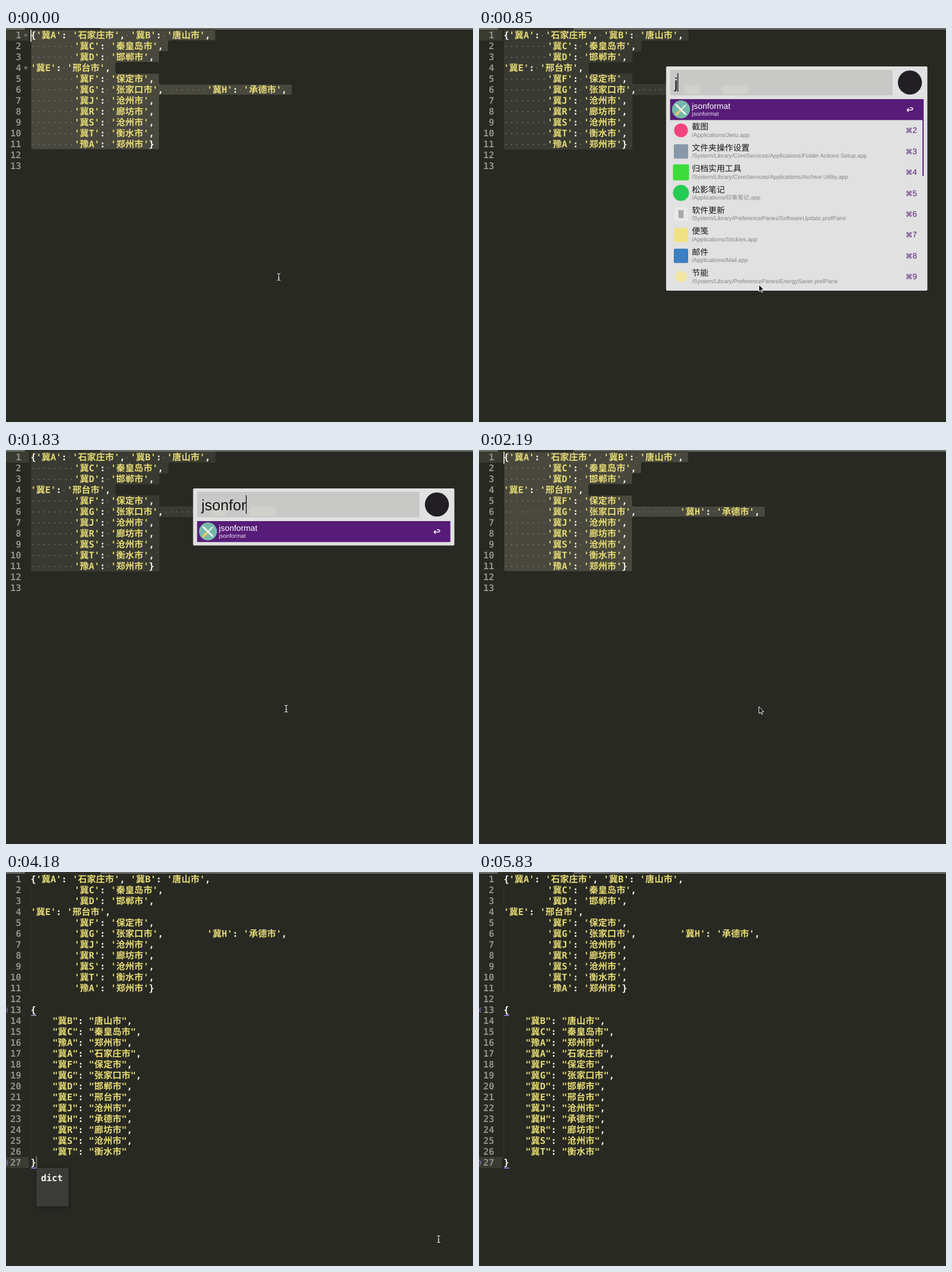
These frames come from a looping animation (815 by 687 pixels, 5.93 s). An HTML page:

```html
<!DOCTYPE html>
<html lang="zh-CN">
<head>
<meta charset="utf-8">
<title>JSON formatting</title>
<style>
  html, body { margin: 0; width: 100%; height: 100%; overflow: hidden; background: #282923; }
  svg { display: block; width: 815px; height: 687px; }
  text { white-space: pre; text-rendering: geometricPrecision; }
  .code { font: bold 15.85px "DejaVu Sans Mono", monospace; }
  .han { font: bold 15.8px "Noto Sans CJK SC", "Noto Sans CJK", sans-serif; }
  .ui { font-family: "Liberation Sans", "Noto Sans CJK SC", "Noto Sans CJK", sans-serif; }
  .popup { filter: drop-shadow(0 1px 3px rgba(0, 0, 0, .35)); }
</style>
</head>
<body>
<svg id="stage" viewBox="0 0 815 687" xmlns="http://www.w3.org/2000/svg"></svg>
<script>
const LOOP = 5930;
const LEFT = 42.9, TOP = 3, LINE = 19, CELL = 9.54, HAN = 15.8;
const YELLOW = '#e6db74', WHITE = '#f8f8f2', PURPLE = '#571c78', VIOLET = '#ae81ff';
const stage = document.getElementById('stage');

function el(tag, attrs = {}, parent = stage, text) {
  const node = document.createElementNS('http://www.w3.org/2000/svg', tag);
  for (const key in attrs) node.setAttribute(key, attrs[key]);
  if (text !== undefined) node.textContent = text;
  parent.appendChild(node);
  return node;
}
const rect = (x, y, width, height, fill, parent, rx = 0) =>
  el('rect', { x, y, width, height, fill, rx }, parent);
const group = parent => el('g', {}, parent);
const show = (node, on) => node.setAttribute('visibility', on ? 'visible' : 'hidden');
const rowTop = row => TOP + LINE * (row - 1);
const isHan = ch => ch > '\u2e80';
const textWidth = s => [...s].reduce((w, ch) => w + (isHan(ch) ? HAN : CELL), 0);

// value of the last key at or before t
function held(keys, t) {
  let value = keys[0][1];
  for (const [at, v] of keys) if (t >= at) value = v;
  return value;
}

const pad = ' '.repeat(8);
const pair = (key, city) => `'${key}': '${city}'`;
const source = [
  `{${pair('冀A', '石家庄市')}, ${pair('冀B', '唐山市')},`,
  `${pad}${pair('冀C', '秦皇岛市')},`,
  `${pad}${pair('冀D', '邯郸市')},`,
  `${pair('冀E', '邢台市')},`,
  `${pad}${pair('冀F', '保定市')},`,
  `${pad}${pair('冀G', '张家口市')},${pad}${pair('冀H', '承德市')},`,
  `${pad}${pair('冀J', '沧州市')},`,
  `${pad}${pair('冀R', '廊坊市')},`,
  `${pad}${pair('冀S', '沧州市')},`,
  `${pad}${pair('冀T', '衡水市')},`,
  `${pad}${pair('豫A', '郑州市')}}`
];
const cities = {};
for (const m of source.join().matchAll(/'(..)': '(.+?)'/g)) cities[m[1]] = m[2];
const order = [...'BC', '豫A', ...'AFGDEJHRST'].map(k => k.length > 1 ? k : '冀' + k);
const result = ['{', ...order.map((k, i) =>
  `    "${k}": "${cities[k]}"${i < order.length - 1 ? ',' : ''}`), '}'];

function drawCode(line, row, parent, dots) {
  let x = LEFT, quoted = false, run = null;
  const flush = () => {
    if (run) el('text', { x: run.x, y: rowTop(row) + 15, class: run.cls, fill: run.fill }, parent, run.s);
    run = null;
  };
  for (const ch of line) {
    const quote = ch === "'" || ch === '"';
    const fill = quoted || quote ? YELLOW : WHITE;
    const cls = isHan(ch) ? 'han' : 'code';
    if (quote) quoted = !quoted;
    if (ch === ' ') {
      flush();
      if (dots) el('circle', { cx: x + CELL / 2 - .5, cy: rowTop(row) + 10, r: 1, fill: '#7a7868' }, dots);
    } else {
      if (run && (run.fill !== fill || run.cls !== cls)) flush();
      run = run || { x, fill, cls, s: '' };
      run.s += ch;
    }
    x += isHan(ch) ? HAN : CELL;
  }
  flush();
}

const lineNumber = (row, parent) =>
  el('text', { x: 26.5, y: rowTop(row) + 15, class: 'code', fill: '#90918b', 'text-anchor': 'end' }, parent, row);

function guide(from, to, parent) {
  el('path', { d: `M43.5 ${rowTop(from)}V${rowTop(to + 1)}`, stroke: '#45463e', 'stroke-dasharray': '1 1' }, parent);
}

// outline of the selected rows, with rounded corners
function selectionPath(radius) {
  const ends = source.map(s => LEFT + textWidth(s) + 9);
  const points = [[43.5, TOP]];
  ends.forEach((x, i) => {
    if (i && Math.abs(x - ends[i - 1]) < .1) points.pop();
    else points.push([x, rowTop(i + 1)]);
    points.push([x, rowTop(i + 2)]);
  });
  points.push([43.5, rowTop(12)]);
  const toward = (a, b) => {
    const d = Math.hypot(b[0] - a[0], b[1] - a[1]) || 1;
    return [a[0] + (b[0] - a[0]) / d * radius, a[1] + (b[1] - a[1]) / d * radius];
  };
  return points.map((p, i) => {
    const before = points[(i + points.length - 1) % points.length];
    const after = points[(i + 1) % points.length];
    return `${i ? 'L' : 'M'}${toward(p, before)}Q${p} ${toward(p, after)}`;
  }).join('') + 'Z';
}

// editor
rect(0, 0, 815, 687, '#282923');
rect(0, 0, 815, 3, '#696a66');
rect(33, 0, 132, 3, '#32332d');
const activeRow = rect(0, TOP, 40, LINE, '#3a3b31');
const selection = el('path', { d: selectionPath(2.5) });
const dots = group();
const guides = group();
guide(2, 3, guides);
guide(5, 11, guides);
const codeLayer = group();
source.forEach((line, i) => drawCode(line, i + 1, codeLayer, dots));
for (let row = 1; row <= 13; row++) lineNumber(row, codeLayer);

const folds = group();
for (const row of [1, 4])
  el('path', { d: `M30.5 ${rowTop(row) + 7.5}h8l-4 6z`, fill: '#6b6c66' }, folds);

const pasted = group();
guide(14, 26, pasted);
result.forEach((line, i) => drawCode(line, i + 13, pasted));
for (let row = 14; row <= 27; row++) lineNumber(row, pasted);
const underlines = [13, 27].map(row => rect(44, rowTop(row) + 18.5, 9, 1.5, VIOLET, pasted));
[['{', 13], ['}', 27]].forEach(([ch, row]) =>
  el('text', { x: -1, y: rowTop(row) + 12.5, 'font-size': 10, 'font-family': '"DejaVu Sans Mono", monospace', fill: VIOLET }, pasted, ch));

const caret = rect(0, 0, 1.6, 21, WHITE);

const popup = el('g', { class: 'popup' });
rect(53, 516, 56, 67, '#3b3c38', popup);
el('text', { x: 61, y: 539, class: 'code', fill: WHITE }, popup, 'dict');

// launcher
const launcher = group();
const panel = rect(326.5, 67, 456, 57, '#e1e1e1', launcher, 2);
rect(333.5, 73, 388, 44.5, '#c8c8c7', launcher);
rect(358, 99, 29, 16, '#d1d0cb', launcher, 8);
rect(423, 99, 48, 16, '#d1d0cb', launcher, 8);
const query = el('text', { x: 341, y: 105, class: 'ui', 'font-size': 26, fill: '#161616' }, launcher);
const queryCaret = rect(341, 79, 1.5, 32, '#222', launcher);
el('circle', { cx: 752, cy: 95, r: 21, fill: '#211f24' }, launcher);

function entry(index, title, path, parent) {
  const y = 142 + 36.4 * index, first = index === 0;
  const label = (x, dy, size, fill, s) =>
    el('text', { x, y: y + dy, class: 'ui', 'font-size': size, fill }, parent, s);
  label(371.5, -1, 14.4, first ? '#fff' : '#161616', title);
  label(371.5, 11.3, 10.07, first ? '#eadff0' : '#858585', path);
  if (!first) {
    el('text', { x: 744.5, y: y + 5, 'font-size': 12, 'font-family': '"DejaVu Sans", sans-serif', fill: PURPLE }, parent, '⌘');
    label(756.5, 5, 14, PURPLE, index + 1);
  }
}
const disc = (index, r, fill, parent) =>
  el('circle', { cx: 352.5, cy: 142 + 36.4 * index, r, fill }, parent);
const tile = (index, size, fill, parent) =>
  rect(352.5 - size / 2, 142.5 + 36.4 * index - size / 2, size, size, fill, parent, 2);

const topHit = group(launcher);
rect(333.5, 124, 442, 36.5, PURPLE, topHit);
disc(0, 15.7, '#76b9aa', topHit);
el('path', { d: 'M344 134L360 150', stroke: '#f4f4ee', 'stroke-width': 3, 'stroke-linecap': 'round' }, topHit);
el('path', { d: 'M361 134L351 144', stroke: '#f4f4ee', 'stroke-width': 2 }, topHit);
el('path', { d: 'M350 145L344.5 150.5', stroke: '#e6c86c', 'stroke-width': 4.5, 'stroke-linecap': 'round' }, topHit);
entry(0, 'jsonformat', 'jsonformat', topHit);
el('path', { d: 'M750 140L747 143L750 146M747.5 143H754Q757 143 757 141Q757 139 754 139H752', fill: 'none', stroke: '#fff', 'stroke-width': 1.4 }, topHit);

const hits = group(launcher);
const library = '/System/Library/', services = library + 'CoreServices/Applications/', panes = library + 'PreferencePanes/';
[
  ['截图', '/Applications/Jietu.app'],
  ['文件夹操作设置', services + 'Folder Actions Setup.app'],
  ['归档实用工具', services + 'Archive Utility.app'],
  ['松影笔记', '/Applications/印象笔记.app'],
  ['软件更新', panes + 'SoftwareUpdate.prefPane'],
  ['便笺', '/Applications/Stickies.app'],
  ['邮件', '/Applications/Mail.app'],
  ['节能', panes + 'EnergySaver.prefPane']
].forEach(([title, path], i) => entry(i + 1, title, path, hits));
disc(1, 12, '#f3437f', hits);
tile(2, 25, '#8998a8', hits);
tile(3, 28, '#3fdc3b', hits);
disc(4, 14, '#25cc53', hits);
tile(5, 24, '#e9e9e9', hits);
rect(348, 317.5, 9, 14, '#a9a9a9', hits, 1);
tile(6, 25, '#f0e284', hits);
tile(7, 25, '#3b7fc4', hits);
disc(8, 10, '#f2e6a0', hits);
rect(774, 124, 2, 134, PURPLE, hits);

// pointers
const beam = group();
for (const [stroke, width] of [['#1b1b18', 3], ['#e8e8e4', 1.2]])
  el('path', { d: 'M-3 -6Q0 -6 0 -4Q0 -6 3 -6M0 -4V4M-3 6Q0 6 0 4Q0 6 3 6M-1.5 1.5H1.5', fill: 'none', stroke, 'stroke-width': width }, beam);
const arrow = el('path', {
  d: 'M488.5 447.5V459.5L491.2 457L493 461L495 460.2L493.2 456.3H497Z',
  fill: '#111', stroke: '#f4f4f4', 'stroke-width': 1
});

const caretKeys = [[0, 1], [230, .7], [320, .35], [410, 0], [2190, 1], [2670, .5], [2760, 0],
  [3200, 1], [4180, .4], [4260, 0], [4700, .5], [4790, 1], [5230, 0]];
const queryKeys = [[0, ''], [850, 'j'], [1020, 'js'], [1200, 'json'], [1470, 'jsonf'], [1830, 'jsonfor']];
const path = [[3830, 489, 451], [4175, 755, 640], [4262, 787, 666], [4349, 791, 684], [4430, 791, 700]];

function beamPlace(t) {
  if (t < 80) return [476, 434];
  const q = 3740 + Math.floor((t - 3740) / 87) * 87;
  if (q <= path[0][0]) return path[0].slice(1);
  for (let i = 1; i < path.length; i++) {
    const [t0, x0, y0] = path[i - 1], [t1, x1, y1] = path[i];
    if (q <= t1) {
      const k = (q - t0) / (t1 - t0);
      return [x0 + (x1 - x0) * k, y0 + (y1 - y0) * k];
    }
  }
  return [791, 720];
}

function draw(t) {
  const open = t >= 580 && t < 2190, selected = t < 3200, full = t >= 3740;
  const row = selected ? 1 : full ? 27 : 13;
  activeRow.setAttribute('y', rowTop(row));
  show(selection, selected);
  show(dots, selected);
  show(guides, !selected);
  show(folds, t < 80);
  selection.setAttribute('fill', open ? '#393a33' : '#49483e');
  selection.setAttribute('stroke', open ? 'none' : '#22231d');

  caret.setAttribute('x', full ? 52.5 : 42.7);
  caret.setAttribute('y', full ? 495.5 : rowTop(row) - (row > 1 ? 1 : 0));
  caret.setAttribute('opacity', held(caretKeys, t));
  show(pasted, full);
  show(popup, t >= 4000 && t < 5760);
  underlines[0].setAttribute('fill', t < 5760 ? '#aaa2cc' : VIOLET);

  launcher.setAttribute('display', open ? 'inline' : 'none');
  if (open) {
    const typed = held(queryKeys, t), list = typed === 'j';
    query.textContent = typed;
    queryCaret.setAttribute('x', 340.5 + (typed ? query.getComputedTextLength() : 0));
    panel.setAttribute('height', list ? 391 : typed ? 99.5 : 57);
    topHit.setAttribute('display', typed ? 'inline' : 'none');
    hits.setAttribute('display', list ? 'inline' : 'none');
  }

  const pointing = (t >= 670 && t < 1650) || (t >= 2190 && t < 3290);
  show(arrow, pointing);
  show(beam, !pointing);
  beam.setAttribute('transform', `translate(${beamPlace(t)})`);
}

const start = performance.now();
function tick() {
  draw((performance.now() - start) % LOOP);
  requestAnimationFrame(tick);
}
tick();
</script>
</body>
</html>
```
